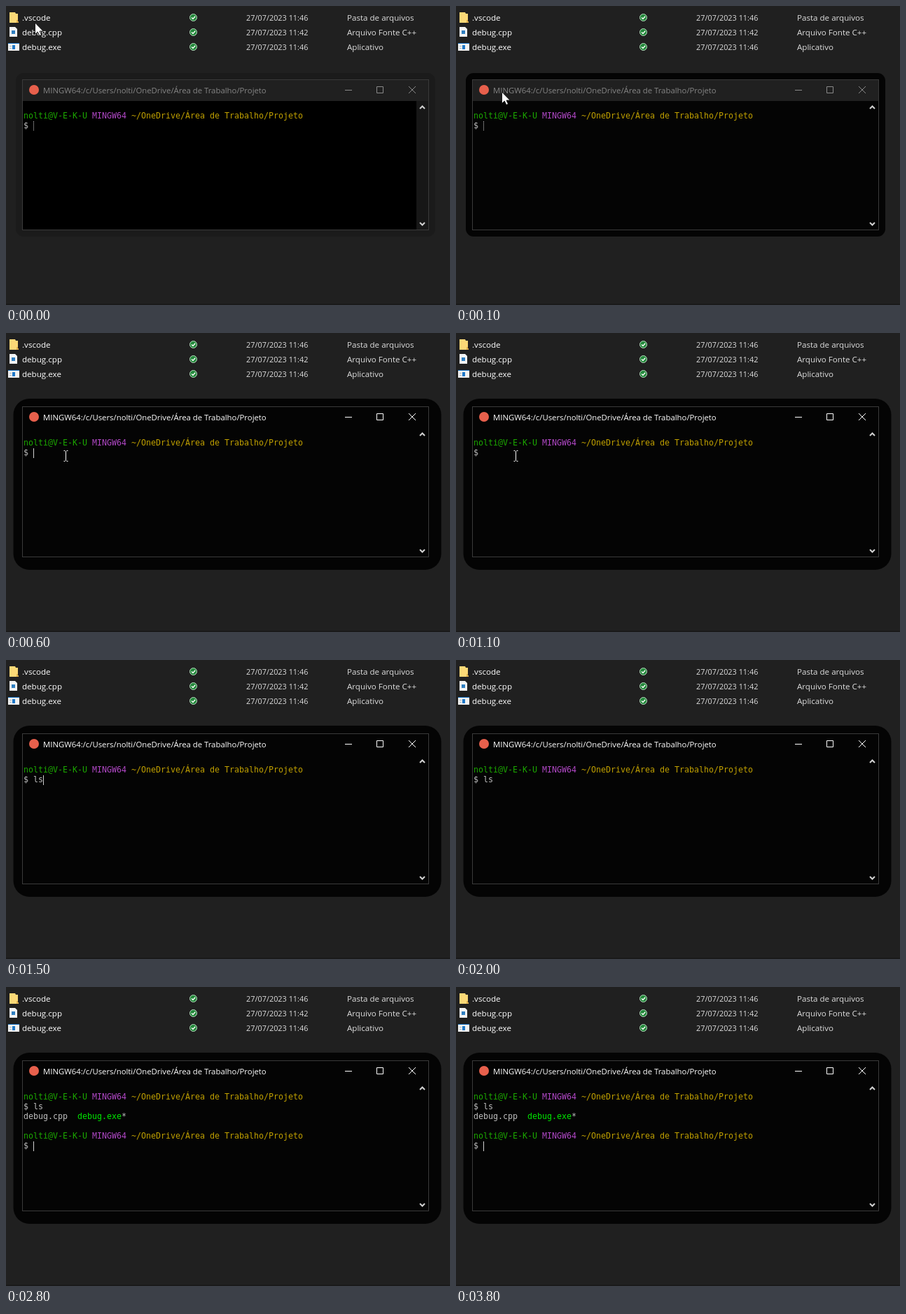
Animation of 634 by 428 pixels, one loop 4200 ms. Source, as an HTML page:

```html
<!DOCTYPE html>
<html lang="pt">
<head>
<meta charset="utf-8">
<title>Terminal</title>
<style>
html, body { margin: 0; width: 100%; height: 100%; overflow: hidden; background: #202020; }
svg { display: block; }
text { font: 11.6px "Open Sans", "Noto Sans", sans-serif; fill: #dedede; white-space: pre; }
#title { font-size: 11.35px; }
.name { fill: #fff; }
.date { font-size: 10.9px; }
.term text { font: 11.63px "DejaVu Sans Mono", "Liberation Mono", monospace; fill: #bfbfbf; }
.user { fill: #1ca800; }
.sys { fill: #b148c6; }
.path { fill: #c0a000; }
.term .exe { fill: #00e800; }
.line { fill: none; }
</style>
</head>
<body>
<svg width="634" height="428" viewBox="0 0 634 428">
  <defs>
    <g id="ok">
      <circle r="5" fill="#23893b" stroke="#b9dcc0"/>
      <path class="line" d="M-2.5 0l2 2 3.2-3.7" stroke="#fff" stroke-width="1.4"/>
    </g>
  </defs>

  <rect width="634" height="428" fill="#202020"/>
  <rect y="426" width="634" height="2" fill="#1a1a1a"/>

  <g id="files"></g>
  <path d="M5 9h8l1 2h3v13H5z" fill="#fbd977"/>
  <path d="M15 20h2v2h1v2h-3z" fill="#e0b04c"/>
  <path d="M5 30h8l3 3v11H5z" fill="#f4f4f4"/>
  <rect x="8" y="35" width="5" height="5" fill="#2f7fc1"/>
  <path d="M3 53h16v11H3z" fill="#f2f2f2"/>
  <path d="M3 53h16v1H3zM9 56h4v6H9z" fill="#1f78c8"/>
  <path d="M5 57h3v1H5zM5 60h3v1H5z" fill="#a8b4c0"/>

  <rect id="shadow"/>
  <rect id="body" x="23.5" y="105.5" width="580" height="215" stroke="#3a3a3a"/>
  <rect id="bar" x="24" y="106" width="579" height="30"/>
  <rect id="strip" x="586" y="136" width="17" height="184"/>
  <circle cx="40" cy="120" r="7" fill="#e8604c"/>
  <text id="title" x="53" y="125">MINGW64:/c/Users/nolti/OneDrive/Área de Trabalho/Projeto</text>
  <path id="buttons" class="line" d="M484 120.5h10M529.5 115.5h9v9h-9zM575 115l10 10M585 115l-10 10"/>
  <path class="line" d="M591 147l3.5-3.5 3.5 3.5M591 310l3.5 3.5 3.5-3.5" stroke="#d0d0d0" stroke-width="2"/>

  <g class="term">
    <g id="prompt">
      <text x="25" y="161"><tspan class="user">nolti@V-E-K-U</tspan> <tspan class="sys">MINGW64</tspan> <tspan class="path">~/OneDrive/Área de Trabalho/Projeto</tspan></text>
      <text x="25" y="175">$</text>
    </g>
    <text id="typed" x="39" y="175"></text>
    <g id="output">
      <text x="25" y="189">debug.cpp</text>
      <text class="exe" x="102" y="189">debug.exe</text>
      <text x="165" y="189">*</text>
    </g>
    <use id="again" href="#prompt" y="56"/>
  </g>
  <path id="caret" d="M0 0v14" stroke="#d0d0d0"/>

  <path id="arrow" d="M0 0V16.5L3.8 13 6.3 18.5 9 17.3 6.5 12H11.7z" fill="#fff" stroke="#000" stroke-width=".8"/>
  <g id="beam" class="line">
    <path d="M-3.5 .5H3.5M-3.5 15.5H3.5M0 0V16" stroke="#000" stroke-width="3"/>
    <path d="M-3 .5H-1M1 .5H3M-3 15.5H-1M1 15.5H3M0 1V15" stroke="#fff"/>
  </g>
</svg>
<script>
const LOOP = 4200;
const $ = id => document.getElementById(id);
const set = (id, attrs) => {
  for (const key in attrs) $(id).setAttribute(key, attrs[key]);
};
const show = (id, on) => set(id, { visibility: on ? "visible" : "hidden" });
const move = (id, x, y) => set(id, { transform: `translate(${x} ${y})` });

const files = [
  [".vscode", "11:46", "Pasta de arquivos"],
  ["debug.cpp", "11:42", "Arquivo Fonte C++"],
  ["debug.exe", "11:46", "Aplicativo"]
];
$("files").innerHTML = files.map(([name, time, kind], i) => `
  <g transform="translate(0 ${i * 21})">
    <text class="name" x="23" y="21">${name}</text>
    <use href="#ok" x="267.5" y="16.5"/>
    <text class="date" x="343" y="21">27/07/2023 ${time}</text>
    <text x="487" y="21">${kind}</text>
  </g>`).join("");

// Pointer position for each 100 ms step until it rests
const pointer = [[41.5, 24], [65.5, 123], [76.5, 152], [82.5, 163], [84.5, 167], [85.5, 168]];

function drawWindow(t) {
  const active = t >= 600, hover = t >= 100;
  const black = "#040404";
  set("shadow", active
    ? { x: 10.5, y: 94, width: 611, height: 245, rx: 23, fill: black }
    : { x: 14, y: 96, width: 599, height: 234, rx: 11, fill: hover ? black : "#1b1b1b" });
  set("body", { fill: hover ? black : "#000" });
  set("bar", { fill: active ? black : "#202020" });
  set("strip", { fill: hover ? black : "#171717" });
  $("title").style.fill = active ? "#fff" : "#858585";
  set("buttons", { stroke: active ? "#fff" : "#8a8a8a" });
}

function drawTerminal(t) {
  const typed = t < 1400 ? "" : t < 1500 ? "l" : "ls";
  $("typed").textContent = typed;
  show("output", t >= 2400);
  show("again", t >= 2800);

  const [x, y] = t < 2400 ? [39.5 + 7 * typed.length, 165] : t < 2800 ? [25.5, 193] : [39.5, 221];
  const off = (t >= 1100 && t < 1400) || (t >= 2000 && t < 2400) || (t >= 3300 && t < 3800);
  move("caret", x, y);
  show("caret", !off);
  set("caret", { "stroke-dasharray": t < 600 ? "1 1" : "none" });
}

function drawPointer(t) {
  const step = Math.min(Math.floor(t / 100), pointer.length - 1);
  const id = step < 2 ? "arrow" : "beam";
  show("arrow", step < 2);
  show("beam", step >= 2 && t < 1400);
  move(id, ...pointer[step]);
}

function frame(now) {
  const t = now % LOOP;
  drawWindow(t);
  drawTerminal(t);
  drawPointer(t);
  requestAnimationFrame(frame);
}
frame(0);
</script>
</body>
</html>
```
